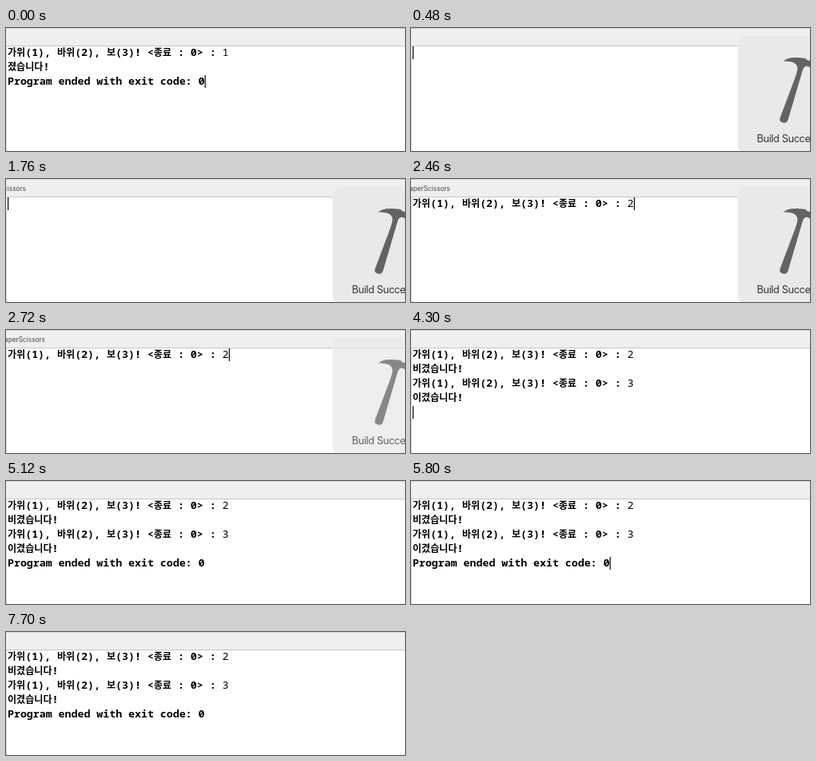
These frames come from a looping animation (499x154 px, 7.8 s). An HTML page:

```html
<!DOCTYPE html>
<html lang="ko">
<head>
<meta charset="utf-8">
<style>
html, body { margin: 0; width: 100%; height: 100%; overflow: hidden; background: #fff; }
svg { display: block; }
text { white-space: pre; }
#lines { font: 700 13.25px "Noto Sans Mono", monospace; }
.ko { font: 700 12.07px "Noto Sans CJK KR", "Noto Sans CJK", sans-serif; }
.typed { font-weight: 400; }
#title { font: 8.3px Inter, sans-serif; fill: #444; text-anchor: end; }
#label { font: 12.8px Inter, sans-serif; letter-spacing: -.4px; fill: #333; }
</style>
</head>
<body>
<svg width="499" height="154" viewBox="0 0 499 154">
  <rect width="499" height="154" fill="#fff"/>
  <rect width="499" height="22" fill="#efefef"/>
  <rect width="499" height="1" fill="#d3d3d3"/>
  <rect y="22" width="499" height="1" fill="#c6c6c6"/>
  <rect y="22" width="1" height="132" fill="#d8d8d8"/>
  <text id="title" y="14.6">RockPaperScissors</text>
  <g id="lines"></g>
  <rect id="caret" width="1.2" height="16"/>
  <g id="hud">
    <rect x="408.5" y="10" width="148" height="147" rx="11" fill="#e9e9e9"/>
    <path fill="#636363" d="M465.5 41.5C470 37.5 476 36.5 483 37C488 37.3 491 37.5 494 38.2
      C495 40.5 497 41 499 40.8V50C497.5 47.5 494.5 47 492.5 48.5C490.5 50 490 52 489 55.5
      L471.5 115Q470 119.5 465.5 118.5Q460 117.5 461.5 112.5L480.5 62
      C482.5 56 484.5 50.5 482.5 47C479.5 42 473 41.5 465.5 41.5Z"/>
    <text id="label" x="432.5" y="142.6">Build Succeeded</text>
  </g>
</svg>
<script>
const LOOP = 7800, PITCH = 18;
const el = id => document.getElementById(id);
const ask = "가위(1), 바위(2), 보(3)! <종료 : 0> : ";
const ended = "Program ended with exit code: 0";
const draw = "비겼습니다!", win = "이겼습니다!";

// Console contents from each time on; "|" starts the typed answer
const screens = [
  [0, [ask + "|1", "졌습니다!", ended]],
  [480, []],
  [1940, [ask]],
  [2460, [ask + "|2"]],
  [2880, [ask + "|2", draw, ask]],
  [3940, [ask + "|2", draw, ask + "|3"]],
  [4180, [ask + "|2", draw, ask + "|3", win]],
  [4480, [ask + "|2", draw, ask + "|3", win, ended]]
];
// Caret: time, x, row (x = 0 hides it)
const carets = [
  [0, 248.5, 2], [480, 2, 0], [1100, 0, 0], [1760, 2, 0], [1940, 270.5, 0], [2460, 278.7, 0],
  [2880, 270.5, 2], [3500, 0, 0], [3940, 278.7, 2], [4180, 2, 4], [4480, 248.5, 4],
  [5120, 0, 0], [5800, 248.5, 4], [6420, 0, 0], [7060, 248.5, 4], [7700, 0, 0]
];
// Right edge of the toolbar title
const titles = [[0, -9], [1340, 25], [1800, 49], [4300, -9]];

const at = (list, t) => list.filter(e => e[0] <= t).pop();
const escape = s => s.replace(/</g, "&lt;").replace(/>/g, "&gt;");
const span = (cls, s) => `<tspan class="${cls}">${s}</tspan>`;

function line(s, row) {
  const [text, typed] = s.split("|");
  const body = escape(text).replace(/[가-힣]+/g, k => span("ko", k));
  return `<text x="2" y="${35 + PITCH * row}">${body}${typed ? span("typed", typed) : ""}</text>`;
}

function hudAlpha(t) {
  if (t < 480 || t >= 3500) return 0;
  if (t < 2680) return 1;
  const step = Math.min(8, Math.floor((t - 2680) / 28.5) + 1);
  return 1 - step / 8.55;
}

let shown;
function frame() {
  const t = performance.now() % LOOP;
  const screen = at(screens, t);
  if (screen !== shown) {
    shown = screen;
    el("lines").innerHTML = screen[1].map(line).join("");
  }
  const [, x, row] = at(carets, t);
  el("caret").setAttribute("x", x || -9);
  el("caret").setAttribute("y", 23 + PITCH * row);
  el("title").setAttribute("x", at(titles, t)[1]);
  el("hud").setAttribute("opacity", hudAlpha(t));
  requestAnimationFrame(frame);
}
frame();
</script>
</body>
</html>
```
